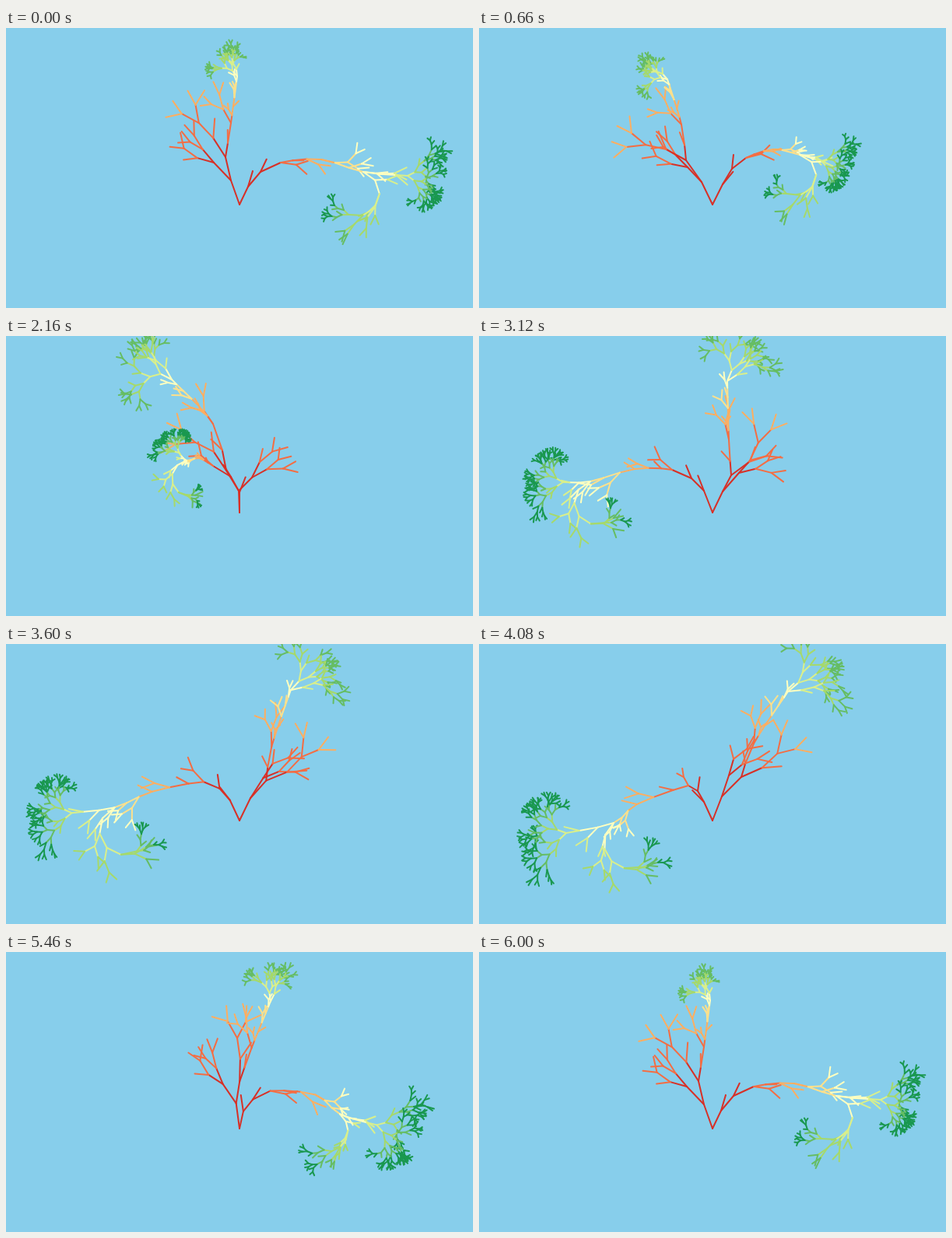
An HTML page with a canvas for the animation above (6.06 s loop, 600 by 360 pixels).

```html
<!DOCTYPE html>
<html lang="en">
<head>
<meta charset="utf-8">
<title>Swaying tree</title>
<style>
  html, body { margin: 0; width: 100%; height: 100%; overflow: hidden; background: #87ceeb; }
  canvas { display: block; width: 600px; height: 360px; }
</style>
</head>
<body>
<canvas id="stage" width="600" height="360"></canvas>
<script>
const ctx = document.getElementById('stage').getContext('2d');
const STEP = 60, STEPS = 101, TAU = Math.PI * 2;
const COLORS = ['#d73027', '#f46d43', '#fdae61', '#fee08b', '#ffffbf',
                '#d9ef8b', '#a6d96a', '#66bd63', '#1a9850'];
const ROOT = [300, 227];

// Phase of each pose, crown size, and joints as x,y pairs:
// long limb (6), hanging limb end, short limb (5).
const PHASES = [0, 0.11, 0.36, 0.52, 0.68, 0.82];
const SIZES = [1, 0.82, 0.6, 0.95, 1.2, 1.3];
const POSES = [
  [311,204, 327,185, 353,173, 405,169, 459,185, 516,190, 440,240, 289,196, 267,173, 282,166, 289,122, 297,62],
  [313,201, 325,181, 343,167, 378,156, 412,163, 440,171, 395,213, 286,198, 268,179, 266,170, 260,124, 242,66],
  [300,201, 289,181, 266,167, 248,157, 232,160, 222,150, 234,206, 299,199, 316,182, 283,173, 266,113, 213,56],
  [289,199, 273,183, 248,172, 200,171, 143,187, 108,188, 162,240, 313,200, 334,176, 324,179, 321,133, 319,58],
  [289,203, 281,189, 269,182, 203,206, 173,230, 112,243, 205,287, 312,196, 321,169, 337,171, 353,128, 397,61],
  [298,205, 304,193, 318,183, 364,197, 366,228, 388,250, 368,270, 303,194, 294,168, 318,168, 339,125, 376,65]
];

let phase = 0;

const rnd = id => {
  const v = Math.sin(id * 12.9898) * 43758.5453;
  return v - Math.floor(v);
};
const wave = shift => Math.sin(TAU * (phase + shift));
const rad = deg => deg * Math.PI / 180;
const wrap = a => Math.atan2(Math.sin(a), Math.cos(a));
// Angles run clockwise from straight up.
const heading = (p, q) => Math.atan2(q[0] - p[0], p[1] - q[1]);
const dist = (p, q) => Math.hypot(q[0] - p[0], q[1] - p[1]);
const ahead = (p, a, len) => [p[0] + Math.sin(a) * len, p[1] - Math.cos(a) * len];

function hermite(p, q, m, n, s) {
  const s2 = s * s, s3 = s2 * s;
  return p * (2 * s3 - 3 * s2 + 1) + m * (s3 - 2 * s2 + s) +
         q * (3 * s2 - 2 * s3) + n * (s3 - s2);
}

// Smooth periodic blend between poses; get(i) reads one value of pose i.
function blend(get) {
  const n = PHASES.length;
  const at = i => get((i + n) % n);
  const time = i => PHASES[(i + n) % n] + Math.floor(i / n);
  const slope = i => (at(i + 1) - at(i - 1)) / (time(i + 1) - time(i - 1));
  const u = phase % 1;
  let i = n - 1;
  while (PHASES[i] > u) i--;
  const span = time(i + 1) - time(i);
  return hermite(at(i), at(i + 1), slope(i) * span, slope(i + 1) * span, (u - time(i)) / span);
}

function colorOf(level) {
  return COLORS[level < 4 ? 0 : Math.min(8, Math.floor(level / 2) - 1)];
}

function line(p, q, level) {
  ctx.strokeStyle = colorOf(level);
  ctx.beginPath();
  ctx.moveTo(p[0], p[1]);
  ctx.lineTo(q[0], q[1]);
  ctx.stroke();
}

// Forking branch; the weaker child often ends after one piece.
function grow(p, a, len, level, max, id) {
  const q = ahead(p, a, len);
  line(p, q, level);
  if (level >= max) return;
  const strong = rnd(id + 0.5) < 0.5 ? -1 : 1;
  for (const side of [-1, 1]) {
    const child = id * 2 + (side > 0 ? 1 : 0);
    const r = rnd(child);
    const turn = side * (0.28 + 0.35 * r) + 0.18 * wave(r * 7);
    const end = side !== strong && rnd(child + 0.3) < 0.5 ? level + 1 : max;
    grow(q, a + turn, len * (0.78 + 0.2 * rnd(child + 0.7)), level + 1, end, child);
  }
}

function twig(p, a, len, level, id) {
  const side = rnd(id) < 0.5 ? -1 : 1;
  const extra = Math.floor(rnd(id + 0.2) * 3);
  grow(p, a + side * 0.42 + 0.25 * wave(rnd(id + 0.4)), len, level, level + extra, id);
}

// Curve through joints, cut into the given number of pieces per span.
function limb(joints, counts, level, twigFrom, id) {
  const tangent = (i, k) => {
    const a = joints[Math.max(0, i - 1)], b = joints[Math.min(joints.length - 1, i + 1)];
    return (b[k] - a[k]) / 2;
  };
  let p = joints[0];
  counts.forEach((n, i) => {
    for (let j = 1; j <= n; j++) {
      const q = [0, 1].map(k =>
        hermite(joints[i][k], joints[i + 1][k], tangent(i, k), tangent(i + 1, k), j / n));
      line(p, q, level);
      const last = i === counts.length - 1 && j === n;
      if (level >= twigFrom && !last) {
        twig(q, heading(p, q), Math.min(20, dist(p, q) * 0.9), level + 1, id + level);
      }
      p = q;
      level++;
    }
  });
}

// Circular arc that leaves along angle a; returns its final angle.
function arc(p, end, a, n, level, id) {
  const chord = heading(p, end);
  const bend = Math.max(-1.7, Math.min(1.7, wrap(chord - a)));
  const d = dist(p, end);
  const len = Math.abs(bend) < 0.01 ? d / n : d * Math.sin(bend / n) / Math.sin(bend);
  for (let i = 0; i < n; i++) {
    const dir = chord - bend + (i + 0.5) * 2 * bend / n;
    const q = ahead(p, dir, len);
    line(p, q, level + i);
    if (i < n - 1) twig(q, dir, len * 0.85, level + i + 1, id + i);
    p = q;
  }
  return chord + bend;
}

function crown(p, a, spread, len, level, max, id) {
  grow(p, a - spread, len, level, max, id);
  grow(p, a + spread, len, level, max, id + 1);
}

function draw() {
  ctx.fillStyle = '#87ceeb';
  ctx.fillRect(0, 0, 600, 360);
  ctx.lineWidth = 2;
  ctx.lineCap = 'round';

  const joint = k => [blend(i => POSES[i][2 * k]), blend(i => POSES[i][2 * k + 1])];
  const [a1, a2, a3, a4, fork, tip, hang, b1, b2, b3, b4, top] =
    POSES[0].slice(0, 12).map((_, k) => joint(k));
  const size = blend(i => SIZES[i]);
  const lean = heading(ROOT, b1);

  // short limb and its two bushes
  line(ROOT, b1, 1);
  line(b1, b2, 2);
  line(b1, b3, 2);
  crown(b2, heading(b1, b2) + lean * 0.7, 0.3, 22, 3, 5, 23);
  grow(b3, heading(b1, b3) + lean, 29, 3, 6, 37);
  limb([b3, b4, top], [2, 6], 3, 3, 60);
  const reach = Math.max(0.6, (dist(b4, top) - 38) / 28);
  crown(top, heading(b4, top) + lean * 1.6, 0.3, 11.5 * reach, 11, 17, 71);

  // long limb
  grow(a1, rad(45) * wave(0.06), 21, 2, 2, 5);
  grow(a2, rad(33) * wave(0.36), 18, 3, 3, 6);
  limb([ROOT, a1, a2, a3, a4, fork, tip], [1, 1, 1, 3, 3, 3], 1, 3, 90);
  const endAngle = arc(fork, hang, heading(a4, fork), 5, 10, 130);
  crown(hang, endAngle, 0.4, 8.5 * size, 15, 20, 151);
  crown(tip, heading(fork, tip), 0.55, 10.5 * size, 13, 20, 173);
}

function tick() {
  phase = Math.floor(performance.now() % (STEP * STEPS) / STEP) / (STEPS - 1);
  draw();
  requestAnimationFrame(tick);
}
tick();
</script>
</body>
</html>
```
